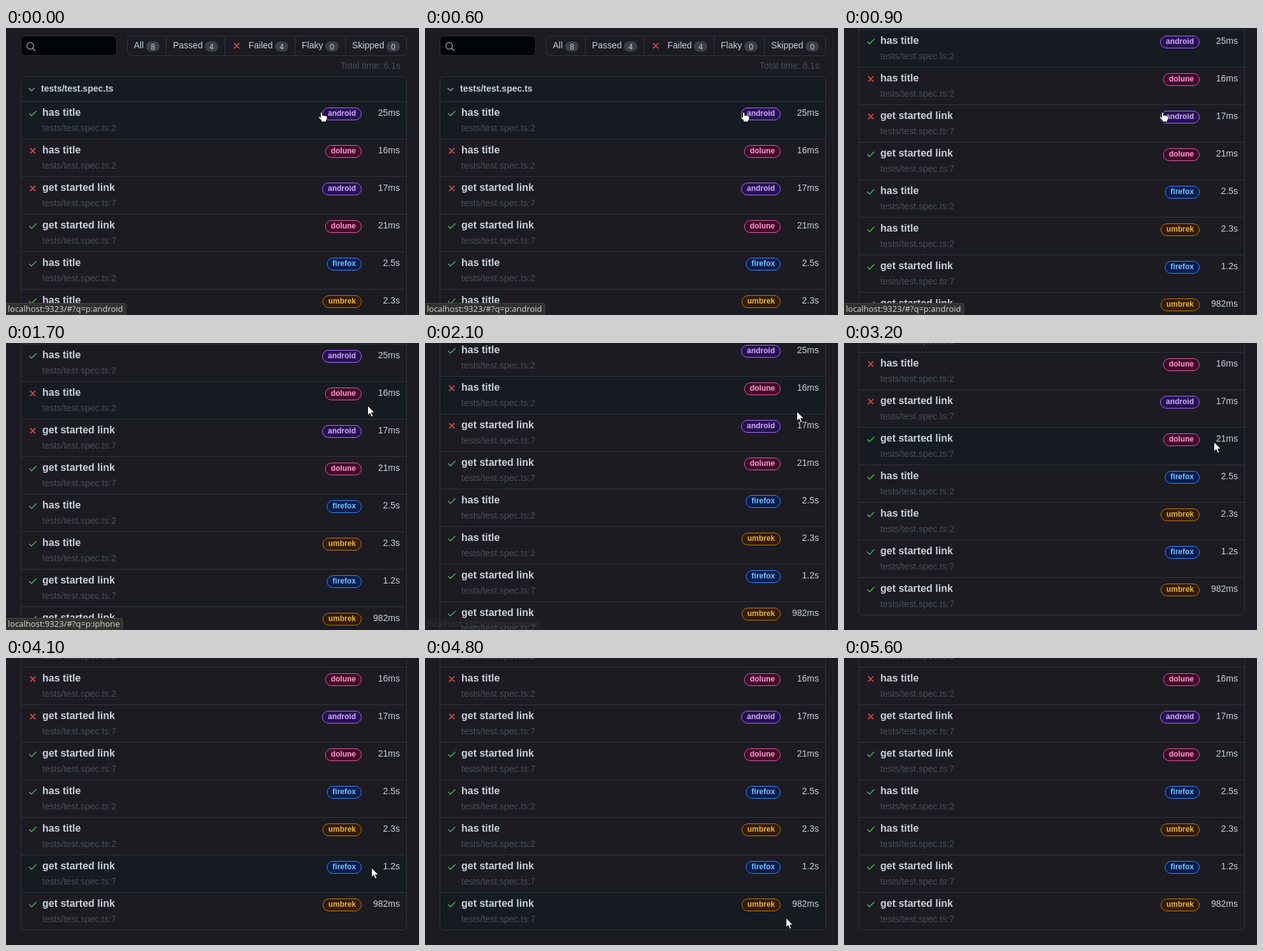
An HTML page that plays this animation: 648 px wide and 451 px high, repeating every 5.8 s.

```html
<!DOCTYPE html>
<html lang="en">
<head>
<meta charset="utf-8">
<title>Test report</title>
<style>
  html, body { margin: 0; width: 100%; height: 100%; overflow: hidden; background: #1c1b22; }
  svg { display: block; font: 14px "Liberation Sans", Arial, sans-serif; fill: #c9d1d9; }
  .title { font-weight: bold; font-size: 16px; }
  .head { font-weight: bold; }
  .dim { fill: #484f58; }
  .pill { font-weight: bold; font-size: 12px; }
  .count { font-size: 12px; text-anchor: middle; }
  .end { text-anchor: end; }
  .line { fill: none; stroke: #30363d; }
  .icon { fill: none; stroke-width: 1.5; stroke-linecap: round; stroke-linejoin: round; }
  .url { font: 13px "Open Sans", "Noto Sans", sans-serif; fill: #d8d8d5; }
  #cursor path { fill: #fff; stroke: #111; stroke-width: 1; stroke-linejoin: round; }
</style>
</head>
<body>
<svg width="648" height="451" viewBox="0 0 648 451">
  <g id="page"></g>
  <g id="status">
    <path id="bar" fill="#323130" stroke="#454442"/>
    <text id="url" class="url" x="3" y="446"></text>
  </g>
  <g id="cursor">
    <path id="hand" d="M-1.5 8.5V1.9a1.5 1.5 0 013 0V5.8c.2-1 2.5-.9 2.7.2.4-.8 2.4-.7 2.6.5.5-.7 2.2-.3 2.2 1V11L7.5 13V15.5H-.5V13L-4.2 9.2c-1-1.6.7-2.6 1.6-1.5z"/>
    <path id="arrow" d="M.5.5V15.6L4 12.3 6.4 18 8.9 16.9 6.5 11.4H11.3z"/>
    <path id="beam" d="M-3.5-7.5h2.5l1 .8 1-.8h2.5v1.5h-2l-.7.8V5.2l.7.8h2v1.5h-2.5l-1-.8-1 .8h-2.5v-1.5h2l.7-.8V-5.2l-.7-.8h-2z" style="stroke-width:.6"/>
  </g>
</svg>
<script>
const $ = id => document.getElementById(id);
const LOOP = 5800, TOP = 115, ROW = 59;

// label: background, text, border
const labels = {
  android: ["#271052", "#d2a8ff", "#a371f7"],
  dolune: ["#42062a", "#ff9bce", "#db61a2"],
  firefox: ["#051d4d", "#79c0ff", "#388bfd"],
  umbrek: ["#341a00", "#e3b341", "#bb8009"],
};
const widths = { android: 62, dolune: 57.3, firefox: 54.7, umbrek: 61.3 };
const tests = [
  ["has title", 1, "android", "25ms"],
  ["has title", 0, "dolune", "16ms"],
  ["get started link", 0, "android", "17ms"],
  ["get started link", 1, "dolune", "21ms"],
  ["has title", 1, "firefox", "2.5s"],
  ["has title", 1, "umbrek", "2.3s"],
  ["get started link", 1, "firefox", "1.2s"],
  ["get started link", 1, "umbrek", "982ms"],
];
// tab: text, text x, badge x, count
const tabs = [["All", 200.5, 220, 8], ["Passed", 262, 312, 4], ["Failed", 380.5, 422, 4],
  ["Flaky", 464, 501, 0], ["Skipped", 543, 597, 0]];

const text = (x, y, str, cls = "", fill = "") =>
  `<text x="${x}" y="${y}" class="${cls}"${fill && ` style="fill:${fill}"`}>${str}</text>`;
const rect = (x, y, w, h, r, attrs) =>
  `<rect x="${x}" y="${y}" width="${w}" height="${h}" rx="${r}" ${attrs}/>`;
const icon = (x, y, d, color) =>
  `<path class="icon" transform="translate(${x} ${y})" d="${d}" stroke="${color}"/>`;
const check = (x, y) => icon(x, y, "M2.75 8.75L6 12 13.25 4.75", "#3fb950");
const cross = (x, y) => icon(x, y, "M4.25 4.25L11.75 11.75M11.75 4.25L4.25 11.75", "#f85149");

function toolbar() {
  return rect(23.5, 12.5, 150, 31, 6, 'fill="#010409" stroke="#30363d"') +
    icon(31, 21, "M12.2 7A5.2 5.2 0 111.8 7a5.2 5.2 0 0110.4 0zM10.8 10.8L14.6 14.6", "#8b949e") +
    rect(190.5, 12.5, 438, 31, 6, 'class="line"') +
    '<path class="line" d="M251.5 13v30M343.5 13v30M453.5 13v30M532.5 13v30"/>' +
    cross(354, 20) +
    tabs.map(([name, x, bx, n]) => text(x, 32, name) +
      rect(bx, 21, 21, 16, 8, 'fill="#6e7681" fill-opacity=".4"') +
      text(bx + 10.5, 33.5, n, "count")).join("") +
    text(619, 64, "Total time: 6.1s", "dim end");
}

function testRow([name, ok, label, time], i) {
  const y = TOP + ROW * i, w = widths[label], [bg, fg, edge] = labels[label];
  return `<path class="line" d="M24 ${y + .5}H628"/>` +
    (ok ? check : cross)(34, y + 11) +
    text(57, y + 23, name, "title") +
    text(57, y + 47, "tests/test.spec.ts:" + (name[0] === "h" ? 2 : 7), "dim") +
    rect(558.5 - w, y + 10.5, w - 1, 19, 9.5, `fill="${bg}" stroke="${edge}"`) +
    text(567 - w, y + 23, label, "pill", fg) +
    text(618, y + 23, time, "end");
}

$("page").innerHTML = toolbar() +
  '<path d="M24 115V82q0-5 5-5H623q5 0 5 5V115z" fill="#161b22"/>' +
  rect(24, 0, 604, 58, 0, 'id="hover" fill="#161b22"') +
  icon(32, 88, "M3.75 6.5L8 10.75 12.25 6.5", "#8b949e") +
  text(55, 100, "tests/test.spec.ts", "head") +
  tests.map(testRow).join("") +
  rect(23.5, 76.5, 605, 511, 6, 'class="line"');

// [time, value...] tracks, linear between keys
const scrollKeys = [[700, 0], [800, 58], [900, 113], [1000, 114], [2000, 114], [2100, 122], [2200, 148], [2300, 160]];
const fadeKeys = [[1900, 1], [2000, .7], [2100, .15], [2200, 0]];
const cursorKeys = [
  [100, 495, 132], [200, 499, 132], [300, 503, 132], [500, 503, 132], [600, 500, 132], [1000, 500, 132],
  [1300, 528, 82], [1400, 537, 84], [1500, 553, 91], [1700, 567, 98], [1900, 583, 107],
  [2200, 583, 107], [2300, 585, 109], [2400, 581, 110], [2600, 581, 110], [2700, 577, 107],
  [2800, 577, 107], [3000, 578, 118], [3200, 580, 155], [3400, 580, 208], [3500, 580, 212],
  [4000, 575, 309], [4100, 573, 329], [4300, 571, 372], [4600, 568, 392], [4800, 566, 408],
  [5400, 36, 0], [5500, 3, 0],
];

function at(keys, t) {
  const i = keys.findIndex(k => k[0] >= t);
  if (i < 1) return keys.at(i).slice(1);
  const a = keys[i - 1], b = keys[i], f = (t - a[0]) / (b[0] - a[0]);
  return a.slice(1).map((v, n) => v + (b[n + 1] - v) * f);
}
const show = (id, on) => $(id).setAttribute("visibility", on ? "visible" : "hidden");
const move = (id, x, y) => $(id).setAttribute("transform", `translate(${x} ${y})`);

function draw(now) {
  const t = Math.floor(now % LOOP / 100) * 100;   // ten pictures a second
  const scroll = Math.round(at(scrollKeys, t)[0]);
  const [x, y] = at(cursorKeys, t).map(Math.round);
  move("page", 0, -scroll);

  // hover catches up only once the first scroll has ended
  const row = t < 1000 ? 0 : Math.floor((y + scroll - TOP) / ROW);
  show("hover", t < 4900);
  $("hover").setAttribute("y", TOP + 1 + ROW * row);

  const first = t < 1400, right = first ? 188 : 183;
  $("url").textContent = "localhost:9323/#?q=p:" + (first ? "android" : "iphone");
  $("bar").setAttribute("d", `M-1 432.5H${right - 3}q3 0 3 3V452H-1z`);
  $("status").setAttribute("opacity", at(fadeKeys, t)[0]);

  const kind = t < 1500 ? "hand" : t === 2300 ? "beam" : "arrow";
  const inside = t < 4900 || t === 5400 || t === 5500;
  for (const id of ["hand", "arrow", "beam"]) show(id, inside && id === kind);
  move("cursor", x, y);
}

let start;
function tick(now) {
  start ??= now;
  draw(now - start);
  requestAnimationFrame(tick);
}
draw(0);
requestAnimationFrame(tick);
</script>
</body>
</html>
```
